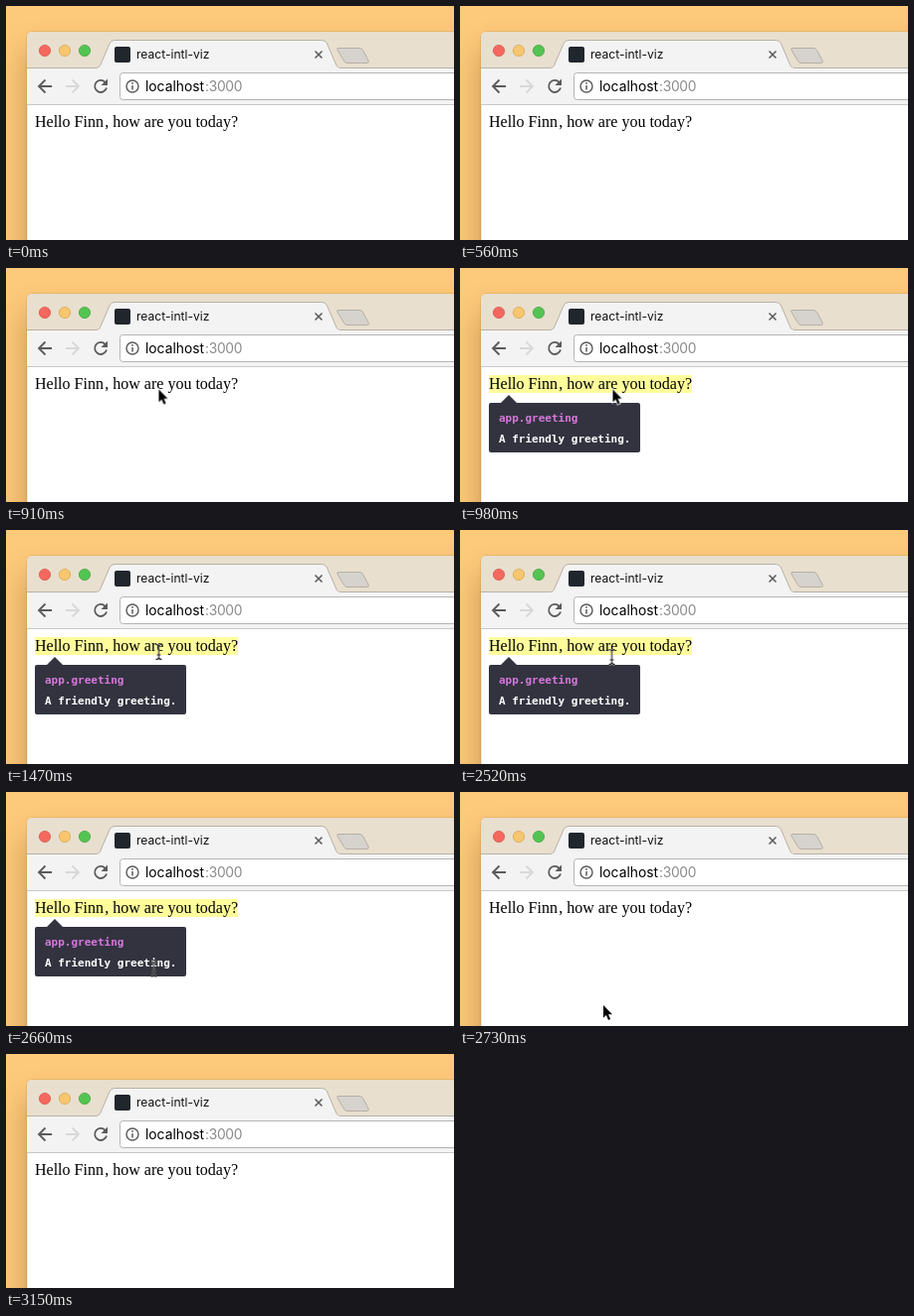
Write an HTML page that moves like this. It is 450 by 236 pixels and loops after 3.29 s.

```html
<!DOCTYPE html>
<html lang="en">
<head>
<meta charset="utf-8">
<title>Tooltip on hover</title>
<style>
  html, body { margin: 0; width: 100%; height: 100%; overflow: hidden; background: #fdc97a; }
  .stage { position: relative; width: 450px; height: 236px; overflow: hidden; }
  .shadow {
    position: absolute; left: 21px; top: 26px; width: 500px; height: 300px;
    border-radius: 5px; box-shadow: 0 20px 30px rgba(90, 50, 0, .34);
  }
  svg { position: absolute; left: 0; top: 0; display: block; }

  .ui { font-family: Inter, Roboto, sans-serif; }
  .page { font: 16px "Liberation Serif", "Times New Roman", serif; }
  .code { font: bold 11px "DejaVu Sans Mono", monospace; }
  .line { fill: none; stroke: #5a5a5a; stroke-width: 1.8; }

  .arrow, .beam, .hint { animation: 3290ms step-end infinite; }
  .arrow { animation-name: arrow; }
  .beam { animation-name: beam; }
  .hint { animation-name: hint; }

  @keyframes arrow {
    0%     { transform: translate(174px, 300px); }
    19.14% { transform: translate(173px, 226px); }
    21.27% { transform: translate(170px, 200px); }
    23.40% { transform: translate(164px, 165px); }
    25.53% { transform: translate(157px, 138px); }
    27.65% { transform: translate(153.5px, 122.5px); }
    31.91% { transform: translate(153px, 300px); }
    82.97% { transform: translate(144px, 215px); }
    85.10%, 100% { transform: translate(142px, 300px); }
  }
  @keyframes beam {
    0%     { transform: translate(153px, 300px); }
    31.91% { transform: translate(153.5px, 123px); }
    76.59% { transform: translate(152.5px, 128px); }
    78.72% { transform: translate(150.5px, 149px); }
    80.85% { transform: translate(148.5px, 178.5px); }
    82.97%, 100% { transform: translate(148px, 300px); }
  }
  @keyframes hint {
    0%     { visibility: hidden; }
    29.78% { visibility: visible; }
    82.97%, 100% { visibility: hidden; }
  }
</style>
</head>
<body>
<div class="stage">
  <div class="shadow"></div>
  <svg width="450" height="236" viewBox="0 0 450 236">
    <defs>
      <path id="caret" fill="none" d="M-3-7.500Q0-7.500 0-5.500Q0-7.500 3-7.500M0-5.500V5.500M-3 7.500Q0 7.500 0 5.500Q0 7.500 3 7.500M-1.800 3H1.800"/>
    </defs>

    <!-- window and title bar -->
    <path d="M21 240V31a5 5 0 0 1 5-5H455V240Z" fill="#fff" stroke="#8a6020" stroke-opacity=".3"/>
    <path d="M21 62V31a5 5 0 0 1 5-5H450V62Z" fill="#e8dfcf"/>
    <g stroke-width=".8">
      <circle cx="39" cy="45" r="5.600" fill="#f4685e" stroke="#d8574b"/>
      <circle cx="59" cy="45" r="5.600" fill="#f7c66f" stroke="#dba850"/>
      <circle cx="79" cy="45" r="5.600" fill="#53c451" stroke="#45a540"/>
    </g>

    <!-- toolbar and tab -->
    <rect x="21" y="62" width="429" height="38" fill="#f3f3f3"/>
    <path d="M21 62.500H90C93 62.500 94 61.500 95 59L104 38Q105.500 34.500 109 34.500H317.500Q321 34.500 322.500 38L331.500 59C332.500 61.500 333.500 62.500 336 62.500H450"
          fill="#f3f3f3" stroke="#b9b1a6"/>
    <path d="M92 63H335" stroke="#f3f3f3" stroke-width="1.200"/>
    <path d="M21 99.500H450" stroke="#c9c9c9"/>
    <path d="M334 42.500H355Q357.500 42.500 358.500 44.500L364 55Q365 57.500 362.500 57.500H343Q340.500 57.500 339.500 55.500L333 44.500Q332 42.500 334 42.500Z"
          fill="#d6d3ce" stroke="#b5aea4"/>
    <rect x="109" y="41" width="16" height="16" rx="2" fill="#20262c"/>
    <text class="ui" x="131" y="53" font-size="12.100" fill="#111">react-intl-viz</text>
    <path class="line" d="M310.500 45.500l7 7m0-7l-7 7" style="stroke-width:1.500"/>

    <!-- navigation -->
    <path class="line" d="M46 81H33.500M39.500 74.500L33 81l6.500 6.500"/>
    <path class="line" d="M60 81H72.500M66.500 74.500L73 81l-6.500 6.500" style="stroke:#d8d8d8"/>
    <path class="line" d="M99.700 77A6 6 0 1 0 101 82.500"/>
    <path d="M102 73.500V80H95.500Z" fill="#5a5a5a"/>

    <!-- address bar -->
    <rect x="114.500" y="67.500" width="360" height="27" rx="3" fill="#fff" stroke="#b4b4b4"/>
    <circle class="line" cx="127" cy="81" r="6" style="stroke-width:1.400"/>
    <path class="line" d="M127 80v4.500M127 77v1.700" style="stroke-width:1.500"/>
    <text class="ui" y="86" font-size="13.800"><tspan x="140" fill="#000">localhost</tspan><tspan x="200" fill="#8a8a8a" letter-spacing="-.3">:3000</tspan></text>

    <!-- page -->
    <rect class="hint" x="29" y="108" width="204" height="18" fill="#fffd9b"/>
    <text class="page" y="122"><tspan x="29">Hello Finn</tspan><tspan x="99.300">, how are you today?</tspan></text>
    <g class="hint">
      <path d="M31 136H41L49 128L57 136H179a2 2 0 0 1 2 2V184a2 2 0 0 1-2 2H31a2 2 0 0 1-2-2V138a2 2 0 0 1 2-2Z" fill="#32333f"/>
      <g class="code">
        <text x="39" y="155" fill="#d977df">app.greeting</text>
        <text x="39" y="175.500" fill="#fff">A friendly greeting.</text>
      </g>
    </g>

    <!-- pointers -->
    <path class="arrow" d="M0 0V12.800L2.900 10.100L5 15L7.100 14.100L5 9.300H9Z"
          fill="#000" stroke="#fff" stroke-width="1.600" paint-order="stroke"/>
    <g class="beam">
      <use href="#caret" stroke="#fff" stroke-opacity=".55" stroke-width="2.200"/>
      <use href="#caret" stroke="#1c1c1c" stroke-width="1.100"/>
    </g>
  </svg>
</div>
</body>
</html>
```
